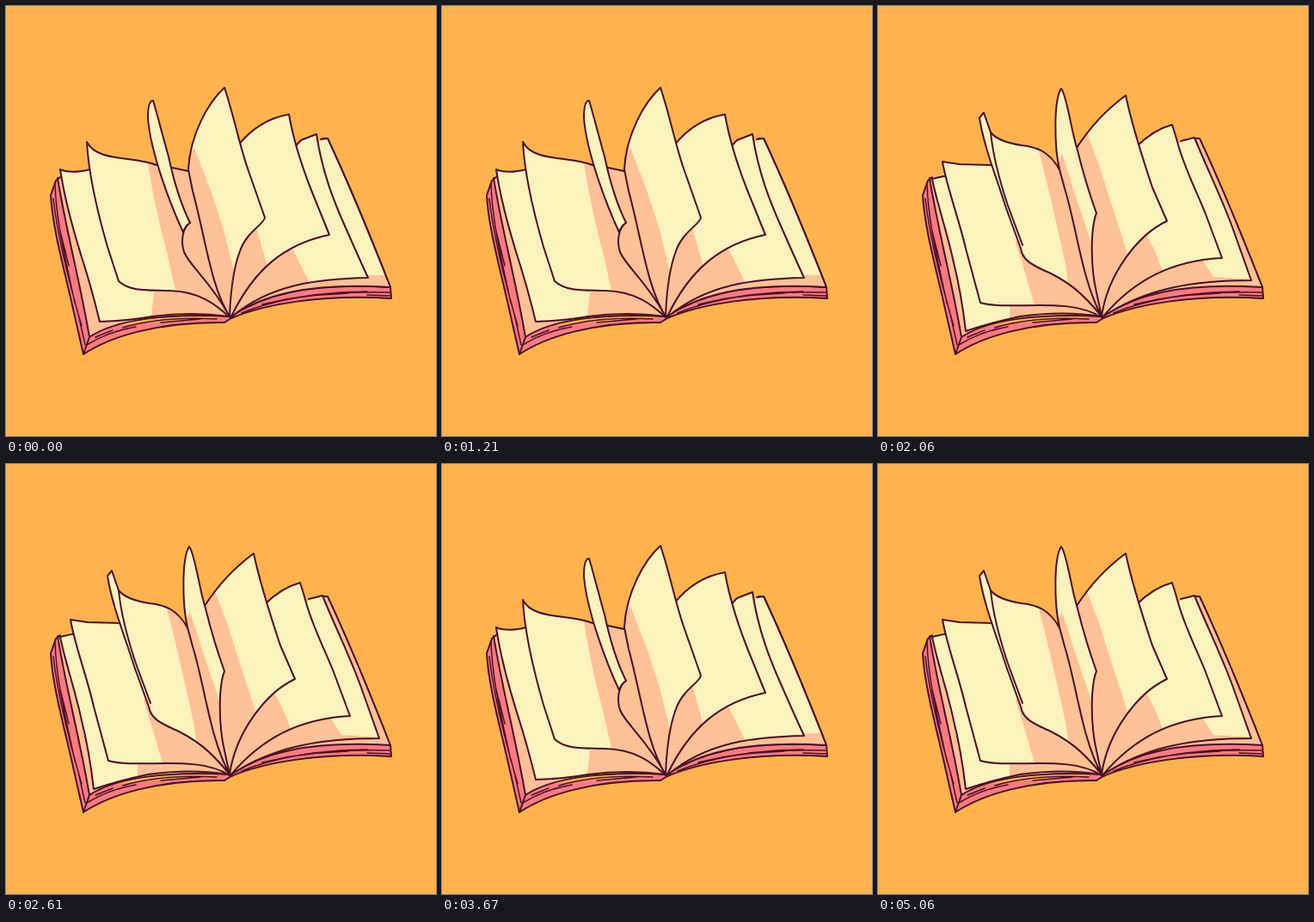
Animation, 500 px wide and 500 px high, one loop 5090 ms. Source, as an HTML page:

```html
<!DOCTYPE html>
<html lang="en">
<head>
<meta charset="utf-8">
<title>Turning pages</title>
<style>
  html, body { margin: 0; width: 100%; height: 100%; overflow: hidden; background: #ffb34d; }
  svg { display: block; width: 100vw; height: 100vh; }
  path { stroke-linecap: round; stroke-linejoin: round; }
  .line { fill: none; stroke: #4a1024; stroke-width: 2; }
  .thin { fill: none; stroke: #4a1024; stroke-width: 1.5; }
  .page { fill: #fcf2bd; }
  .shade { fill: #ffc196; }
  .cover { fill: #fb7b82; }
</style>
</head>
<body>
<svg id="stage" viewBox="0 0 500 500"></svg>
<script>
const LOOP = 5090, CYCLE = 300.6;
const STARTS = [0, 83, 183];

const path = (cls, d, extra = "") => `<path class="${cls}" d="${d}" ${extra}/>`;

const leftEdge = "L52 220C54 256 66 300 75 339L90 405C120 385 175 367 254 368L262 363";
const bottomRight = "C300 347 365 335 448 340L447 327";
const foreEdge = "C427 276 402 214 374 154";
const blockTop = "C348 321 298 337 261 361";

const book =
  path("cover", `M60 200${leftEdge}${bottomRight}${blockTop}L100 374Z`) +
  path("shade", `M60 200C70 262 86 320 97 385C128 364 190 357 260 361C298 337 348 321 447 327${foreEdge}L212 192L90 192Z`) +
  path("line", `M63 199L58 203${leftEdge}${bottomRight}${foreEdge}L368 154`) +
  path("line", `M60 200C70 262 86 320 97 385L90 405M97 385C128 364 190 357 260 361M447 327${blockTop}`) +
  path("thin", "M57 206C58 250 70 298 80 345M55 224C60 267 72 317 88 372M63 262L73 302M84 358L92 394M94 394C110 384 128 377 151 373M104 385L124 377M136 374C166 365 205 362 245 364M180 368L226 364M274 357C315 340 372 331 446 333M298 347C335 338 378 332 420 332M350 337L398 334M420 336L447 337");

// Each page is an outline and the edge of its shadow; pages are listed back to front.
const poses = [
  [
    ["M212 192L98 190Q78 195 65 191L63 190C68 224 78 260 88 292Q99 326 109 367Q142 366 170 361Q215 355 260 361", "M164 184L187 330L172 333L168 370"],
    [`M366 155L374 154C402 214 427 276 447 327${blockTop}`, "M345 318L421 313L438 313L452 313L452 330"],
    ["M330 170L343 156L361 149C368 195 382 229 395 258Q409 290 421 316C362 317 307 324 263 361", "M331 278L353 322"],
    ["M212 192Q190 187 175 185C149 174 106 182 94 158C96 195 107 242 118 280L131 320C145 333 169 330 190 331C224 332 243 346 260 362", "M164 176Q172 232 188 290L199 340"],
    ["M270 162Q294 132 329 126C336 167 351 205 361 229L376 266C323 277 288 307 262 361", "M286 240L302 296L306 318"],
    ["M214 252C205 258 203 274 207 286C214 303 238 320 260 361", "M200 240L200 310"],
    ["M206 263C192 233 168 171 165 130Q165 110 171 110C174 119 180 143 189 175Q199 222 214 252Q208 256 206 263", ""],
    ["M260 361C238 326 232 270 217 215L212 190C214 150 235 112 254 95C264 124 271 160 281 189L301 246C300 254 280 262 272 285Q262 311 260 361", "M262 364L190 300L205 190L219 165L239 217L253 260L267 316"]
  ],
  [
    ["M212 192L85 193L63 196C67 226 80 262 88 293Q98 328 107 375Q137 367 165 361Q215 354 260 361", "M147 190L155 342L158 370"],
    ["M357 156L372 153C387 194 405 235 419 267L441 324C370 320 310 329 262 361", "M385 303L410 306L438 318L448 330"],
    ["M318 165Q335 145 351 142L355 155C363 190 381 231 389 255L407 304C350 304 306 318 262 361", "M316 265L336 320"],
    ["M212 195L158 178L152 175C126 179 101 177 82 170L84 183C92 215 103 253 110 283L124 331C152 344 217 330 260 362", "M147 172Q156 225 170 272L190 348"],
    ["M249 176C264 146 289 121 308 108C317 149 328 184 337 211L354 255C313 269 278 301 261 361", "M264 234L280 278L291 312"],
    ["M212 195C203 174 190 169 172 163Q152 155 147 140L140 118L147 142C153 165 163 195 172 222L187 258Q180 265 184 275C194 291 238 319 260 361", "M186 158L201 215L213 265L220 322"],
    ["M260 361C236 315 230 255 217 222L212 195C208 144 212 106 231 95C236 124 244 148 252 172L274 242C251 262 257 296 256 320Q256 342 260 361", "M262 364L190 300L205 190L217 178L236 228L249 265L260 296"]
  ],
  [
    ["M212 192L76 198L63 201C68 227 80 262 87 294Q97 334 102 378Q132 368 165 361Q215 354 260 361", "M147 190L153 345L153 372"],
    ["M352 157L368 153C383 190 401 226 413 260L434 319C365 319 310 329 262 361", "M374 290L390 315L437 318L440 330"],
    ["M300 164Q320 144 342 138L347 154C355 187 371 216 381 242L400 293C342 296 298 318 261 362", "M310 262L322 285L335 318"],
    ["M212 192L133 185L95 184L75 181C80 211 94 247 102 282L119 345C155 355 220 337 260 362", "M160 275L168 300L184 355"],
    ["M231 165C247 140 269 118 288 104C296 142 308 178 319 211L336 250C302 266 267 312 260 361", "M243 148L257 185L273 235L297 309"],
    ["M212 192C199 168 184 164 167 162Q140 158 131 147L123 124L118 130C123 163 137 197 149 235L166 282C168 295 178 300 190 306C221 319 239 335 260 361", "M185 160L200 220L218 300L223 334"],
    ["M260 361C237 319 231 257 217 212L211 190C205 164 204 110 213 96C220 105 224 143 232 168Q242 208 254 241C247 258 247 303 254 333L260 361", "M262 364L190 300L205 190L214 172L231 225L249 278"]
  ]
];

// Near edge of the page that stands almost side-on in the last pose.
poses[2][5].push("M131 147C134 177 142 205 151 232L168 278");

const drawPage = ([outline, edge, fold], id) =>
  path("page", outline) +
  (edge && `<clipPath id="${id}"><path d="${outline}"/></clipPath>` +
    path("shade", edge + "L262 364L212 190Z", `clip-path="url(#${id})"`)) +
  path("line", outline) +
  (fold ? path("line", fold) : "");

const stage = document.getElementById("stage");
stage.innerHTML = `<rect width="500" height="500" fill="#ffb34d"/>` + book +
  poses.map((pages, i) =>
    `<g>${pages.map((p, j) => drawPage(p, `clip${i}-${j}`)).join("")}</g>`
  ).join("");
const groups = [...stage.querySelectorAll("g")];

function render(time) {
  const phase = (time % LOOP) % CYCLE;
  const current = STARTS.filter(s => phase >= s).length - 1;
  groups.forEach((g, i) => { g.style.display = i === current ? "" : "none"; });
}

const start = performance.now();
function tick() {
  render(performance.now() - start);
  requestAnimationFrame(tick);
}
tick();
</script>
</body>
</html>
```
